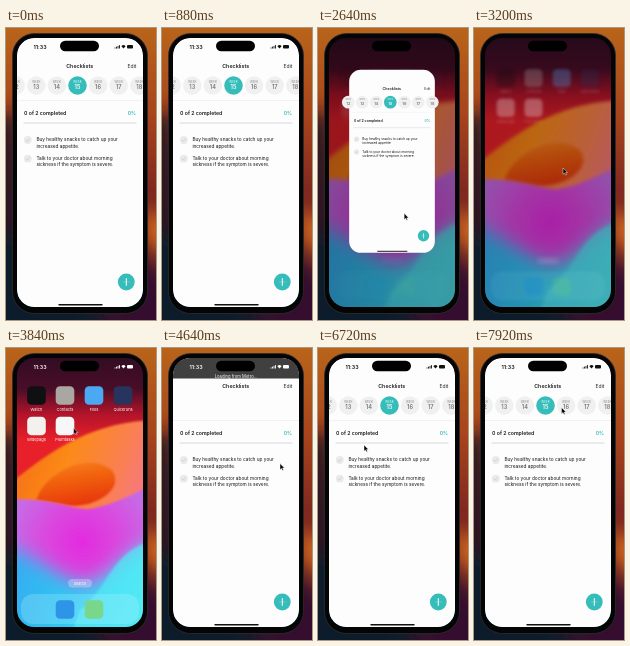
Recreate the animation shown at these times as an HTML page. Size 150 by 292 pixels, loop 8000 ms.

```html
<!DOCTYPE html>
<html lang="en">
<head>
<meta charset="utf-8">
<title>Checklists</title>
<style>
  html, body { margin: 0; width: 100%; height: 100%; overflow: hidden; background: #171522; }
  svg { display: block; width: 100vw; height: 100vh; }
  text { font-family: Inter, Roboto, sans-serif; }
  .mid { text-anchor: middle; }
  .bold { font-weight: 600; }
</style>
</head>
<body>
<svg viewBox="0 0 150 292">
  <defs>
    <clipPath id="screen"><rect x="11" y="10" width="126" height="269" rx="17"/></clipPath>
    <filter id="soft" x="-50%" y="-50%" width="200%" height="200%"><feGaussianBlur stdDeviation="9"/></filter>
    <filter id="edge" x="-20%" y="-20%" width="140%" height="140%"><feGaussianBlur stdDeviation="1"/></filter>
    <linearGradient id="sky" x2="0" y2="1">
      <stop offset="0" stop-color="#2a0d22"/><stop offset=".14" stop-color="#4a0d27"/>
      <stop offset=".23" stop-color="#b5142a"/><stop offset=".32" stop-color="#e8202a"/>
    </linearGradient>
    <linearGradient id="wave" x2="1" y2=".35">
      <stop offset="0" stop-color="#f4601c"/><stop offset=".45" stop-color="#fb8a18"/>
      <stop offset=".75" stop-color="#fa8050"/><stop offset="1" stop-color="#f5758c"/>
    </linearGradient>
    <linearGradient id="ember" x2=".3" y2="1">
      <stop offset="0" stop-color="#f98414"/><stop offset="1" stop-color="#e83a0e"/>
    </linearGradient>
    <radialGradient id="violet" gradientUnits="userSpaceOnUse" cx="76" cy="194" r="72">
      <stop offset="0" stop-color="#e32ae0"/><stop offset=".5" stop-color="#da48de"/><stop offset="1" stop-color="#c66be6"/>
    </radialGradient>
    <linearGradient id="sea" x2="1" y2=".2">
      <stop offset="0" stop-color="#3a9cf0"/><stop offset=".5" stop-color="#2fc6f2"/><stop offset="1" stop-color="#5cf0f6"/>
    </linearGradient>
    <linearGradient id="desk" x2="0" y2="1">
      <stop offset="0" stop-color="#b8641a"/><stop offset=".3" stop-color="#a8441c"/>
      <stop offset=".6" stop-color="#7a2420"/><stop offset="1" stop-color="#34122c"/>
    </linearGradient>
  </defs>

  <!-- Desktop -->
  <rect width="150" height="292" fill="url(#desk)"/>
  <g filter="url(#soft)">
    <path d="M-20 95 10 80 30 300H-20Z" fill="#2c1620"/>
    <path d="M-20 190 60 240 110 310H-20Z" fill="#101c2c"/>
    <path d="M138 178 170 196V238L138 212Z" fill="#d0661c"/>
    <path d="M130 228 170 262V310H100Z" fill="#35102e"/>
  </g>

  <!-- Phone -->
  <rect x="6.5" y="5.5" width="135" height="280" rx="22" fill="#050506" stroke="#2e2c30" stroke-width=".8"/>
  <g clip-path="url(#screen)">
    <g id="wallpaper">
      <rect x="0" y="0" width="150" height="292" fill="url(#sky)"/>
      <g filter="url(#edge)">
        <path d="M-5 142C35 112 78 72 155 72V220H-5Z" fill="url(#wave)"/>
        <path d="M30 152C40 122 84 104 106 122 120 142 88 160 64 158Z" fill="url(#ember)"/>
      </g>
      <path d="M-5 152C40 148 62 160 82 161 108 158 124 146 160 132V300H-5Z" fill="url(#violet)" filter="url(#edge)"/>
      <path d="M-20 190C30 204 56 236 80 236 108 234 112 198 170 190V320H-20Z" fill="url(#sea)" filter="url(#soft)"/>
      <path d="M74 262C104 240 104 202 150 192V300H60Z" fill="#52eaf6" opacity=".7" filter="url(#edge)"/>
    </g>
    <g id="home"></g>
    <g id="app">
      <rect x="11" y="10" width="126" height="269" rx="17" fill="#fdfdfd"/>
      <g id="content">
        <text class="mid bold" x="73.7" y="40" font-size="5.35" fill="#222">Checklists</text>
        <text x="130.5" y="40" font-size="5" text-anchor="end" fill="#222">Edit</text>
        <g id="weeks"></g>
        <path d="M11 72.5H137" stroke="#eee" stroke-width=".7"/>
        <text class="bold" x="18" y="87" font-size="5.2" fill="#181818">0 of 2 completed</text>
        <text class="bold" x="130" y="87" font-size="5" text-anchor="end" fill="#35b9b7">0%</text>
        <path d="M18 95H130" stroke="#e5e6e7" stroke-width="1.3" stroke-linecap="round"/>
        <g id="tasks"></g>
        <circle cx="120.3" cy="254" r="8.4" fill="#36bdba"/>
        <path d="M120.3 250.2V257.8" stroke="#fff" stroke-width="1"/>
        <path d="M117 254H123.6" stroke="#fff" stroke-width=".4" opacity=".6"/>
      </g>
      <g id="banner">
        <path d="M11 30.5V27Q11 10 28 10H120Q137 10 137 27V30.5Z" fill="#404040"/>
        <text class="mid" x="74" y="29.6" font-size="4.2" fill="#fff">Loading from Metro...</text>
      </g>
      <path d="M53 276.8H96" stroke="#111" stroke-width="1.4" stroke-linecap="round"/>
    </g>
    <g id="status">
      <text class="bold" x="27.5" y="21" font-size="5.4">11:33</text>
      <path d="M109 20.5v-1M110.5 20.5v-1.8M112 20.5v-2.6M113.5 20.5v-3.4" stroke="currentColor" stroke-width=".9"/>
      <path d="M115.4 18.2Q117.5 16 119.6 18.2L117.5 20.6Z"/>
      <rect x="121" y="17.1" width="6" height="3.4" rx="1"/>
    </g>
  </g>
  <rect x="54" y="12.7" width="39" height="10.5" rx="5.25" fill="#000"/>
  <path id="cursor" d="M0 0V6.2L1.5 4.9 2.5 7 3.5 6.6 2.6 4.6H4.5Z" fill="#000" stroke="#fff" stroke-width=".45"/>
</svg>
<script>
const LOOP = 8000, STEP = 80;
const el = id => document.getElementById(id);
const icon = (x, y, color, label = '') =>
  `<rect x="${x - 9.3}" y="${y - 9.3}" width="18.6" height="18.6" rx="4.4" fill="${color}"/>
   <text class="mid" x="${x}" y="${y + 15.4}" font-size="4" fill="#fff">${label}</text>`;

el('home').innerHTML =
  icon(30.5, 47.5, '#101012', 'Watch') + icon(59, 47.5, '#aaa6a1', 'Contacts') +
  icon(88, 47.5, '#4aa9f2', 'Files') + icon(117, 47.5, '#26345e', 'Quickruns') +
  icon(30.5, 78, '#f3f1ee', 'Widepage') + icon(59, 78, '#f7f7f7', 'Plumtasks') +
  `<rect x="62" y="231" width="24" height="8.5" rx="4.2" fill="#fff" opacity=".28"/>
   <text class="mid" x="74" y="236.7" font-size="3.8" fill="#fff">Search</text>
   <rect x="15" y="246" width="118" height="30" rx="12" fill="#bdf4ff" opacity=".25"/>` +
  icon(59, 261.5, '#2d94e8') + icon(88, 261.5, '#79d78b');

el('weeks').innerHTML = [12, 13, 14, 15, 16, 17, 18].map((week, i) => {
  const x = 9.7 + i * 20.6, on = week === 15;
  return `<circle cx="${x}" cy="57.5" r="9.3" fill="${on ? '#36bdba' : '#f0f0f1'}"/>
    <text class="mid" x="${x}" y="55" font-size="2.9" fill="${on ? '#e3ffff' : '#888'}">WEEK</text>
    <text class="mid bold" x="${x}" y="61.3" font-size="5.6" fill="${on ? '#fff' : '#777'}">${week}</text>`;
}).join('');

el('tasks').innerHTML = [
  ['Buy healthy snacks to catch up your', 'increased appetite.'],
  ['Talk to your doctor about morning', 'sickness if the symptom is severe.']
].map(([first, second], i) => {
  const y = 112 + i * 18.7;
  return `<circle cx="21.8" cy="${y}" r="3.9" fill="#e9eaeb"/>
    <path d="M20 ${y}l1.3 1.4 2.4-2.8" fill="none" stroke="#c4c6c8" stroke-width=".7"/>
    <g font-size="4.75" fill="#111"><text x="30.4" y="${y + 1.3}">${first}</text>
    <text x="30.4" y="${y + 7.5}">${second}</text></g>`;
}).join('');

// Eased 0..1 progress of t between two times
const ramp = (t, from, to) => {
  const p = Math.min(1, Math.max(0, (t - from) / (to - from)));
  return p * p * (3 - 2 * p);
};
const mix = (a, b, p) => a + (b - a) * p;

// time, x, y
const pointer = [
  [1360, 84, 296], [1720, 78.5, 280], [1960, 78.5, 279], [2400, 82, 185], [2600, 86, 190],
  [2880, 89, 105], [3200, 89, 140], [3680, 67.5, 80], [4080, 67.5, 80], [4560, 118, 115.5],
  [5520, 118, 115.5], [6480, 46, 97], [6960, 46, 97], [7760, 87.5, 59.5], [8000, 87.5, 59.5]
];
function pointerAt(t) {
  const next = pointer.findIndex(k => k[0] > t);
  if (next < 1) return null;
  const [t0, x0, y0] = pointer[next - 1], [t1, x1, y1] = pointer[next];
  const p = ramp(t, t0, t1);
  return [mix(x0, x1, p), mix(y0, y1, p)];
}

const zoom = (x, y, scale) => `translate(${x} ${y}) scale(${scale}) translate(-74 -144.5)`;

function draw(t) {
  const launching = t >= 4000;
  const shrink = ramp(t, 1960, 2480), open = ramp(t, 4000, 4400);
  const scale = launching ? mix(.147, 1, open) : mix(1, .68, shrink);
  const x = launching ? mix(59, 74, open) : 74;
  const y = launching ? mix(78, 144.5, open) : 144.5 - 260 * ramp(t, 2600, 2920);
  const loading = launching ? ramp(t, 4320, 4400) * (1 - ramp(t, 4880, 5120)) : 0;
  el('app').setAttribute('transform', zoom(x, y, scale));
  el('app').style.opacity = launching ? ramp(t, 3960, 4120) : t < 2960 ? 1 : 0;
  el('content').style.opacity = !launching || t >= 4560 ? 1 : 0;
  el('weeks').style.opacity = launching ? ramp(t, 4720, 4960) : 1;
  el('banner').style.opacity = loading;

  const haze = launching ? open : 1 - ramp(t, 3040, 3560);
  el('wallpaper').style.filter = `blur(${2 * haze}px) brightness(${1 - .33 * haze})`;
  el('home').setAttribute('transform', zoom(74, 144.5, 1 - .035 * haze));
  el('home').style.filter = `blur(${2 * haze}px)`;
  el('home').style.opacity = 1 - .9 * haze;

  const away = t > 2040 && t < 4240;
  const status = el('status').style;
  status.fill = status.color = away || loading > .5 ? '#fff' : '#111';
  status.opacity = away ? Math.max(0, 1 - 1.3 * haze) : 1;

  const at = pointerAt(t);
  el('cursor').style.display = at ? '' : 'none';
  if (at) el('cursor').setAttribute('transform', `translate(${at})`);
}

const start = performance.now();
function tick() {
  const t = (performance.now() - start) % LOOP;
  draw(Math.floor(t / STEP) * STEP);
  requestAnimationFrame(tick);
}
tick();
</script>
</body>
</html>
```
